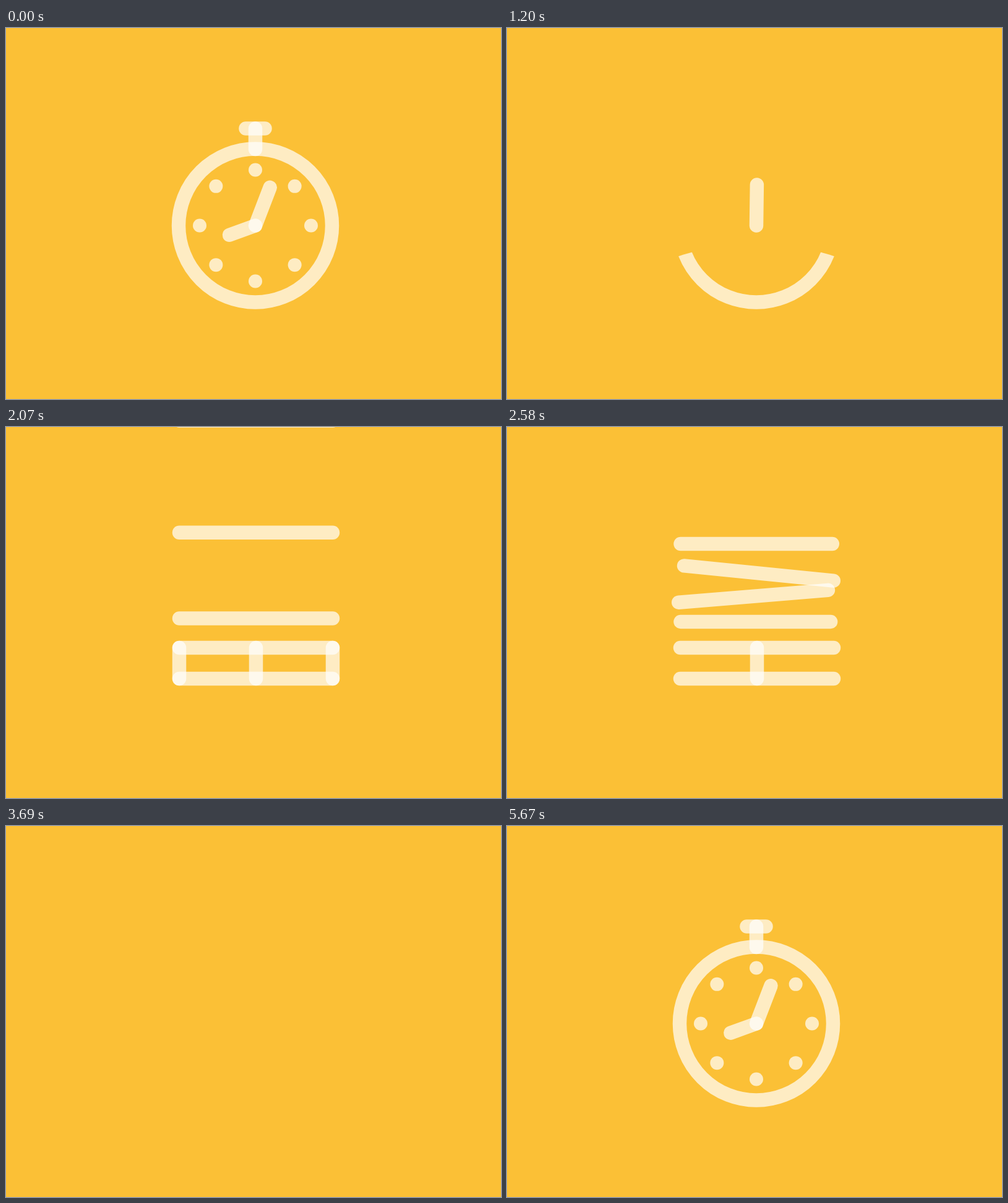
An HTML page with a canvas for the animation above (5.7 s loop, 800x600 px).

```html
<!DOCTYPE html>
<html lang="en">
<head>
<meta charset="utf-8">
<title>Stopwatch to cart</title>
<style>
html, body { margin: 0; width: 100%; height: 100%; overflow: hidden; background: #fbc036; }
canvas { display: block; width: 800px; height: 600px; }
</style>
</head>
<body>
<canvas id="stage" width="800" height="600"></canvas>
<script>
const ctx = document.getElementById('stage').getContext('2d');
const LOOP = 5700, STEP = 30, W = 22.5, RAD = Math.PI / 180;
const CX = 403, CY = 319.5, RING = 124;

const clamp = x => Math.max(0, Math.min(1, x));
const span = (t, a, b) => clamp((t - a) / (b - a));
const mix = (a, b, p) => a + (b - a) * p;
const easeOut = p => 1 - (1 - p) ** 3;
const easeInOut = p => (1 - Math.cos(Math.PI * p)) / 2;
const backOut = p => 1 + 2.7 * (p - 1) ** 3 + 1.7 * (p - 1) ** 2;

// Damped overshoot from 0 to 1, starting at time a.
function spring(t, a, k = 8, w = 17.6) {
  const s = (t - a) / 1000;
  return s <= 0 ? 0 : 1 - Math.exp(-k * s) * Math.cos(w * s);
}

function line(x1, y1, x2, y2) {
  ctx.beginPath();
  ctx.moveTo(x1, y1);
  ctx.lineTo(x2, y2);
  ctx.stroke();
}

function dot(x, y, r = 11) {
  if (r <= 0) return;
  ctx.beginPath();
  ctx.arc(x, y, r, 0, 7);
  ctx.fill();
}

// Bar: centre, half length, angle in degrees.
const bar = (x, y, half, deg) => ({ x, y, half, deg });

function drawBar(b) {
  const dx = b.half * Math.cos(b.deg * RAD), dy = b.half * Math.sin(b.deg * RAD);
  line(b.x - dx, b.y - dy, b.x + dx, b.y + dy);
}

function morph(a, b, p) {
  drawBar(bar(mix(a.x, b.x, p), mix(a.y, b.y, p), Math.max(0, mix(a.half, b.half, p)), mix(a.deg, b.deg, p)));
}

function hand(deg, len) {
  if (len < 0.5) return;
  line(CX, CY, CX + len * Math.sin(deg * RAD), CY - len * Math.cos(deg * RAD));
}

function ring(half = 180) {
  ctx.lineCap = 'butt';
  ctx.beginPath();
  ctx.arc(CX, CY, RING, (90 - half) * RAD, (90 + half) * RAD);
  ctx.stroke();
  ctx.lineCap = 'round';
}

function knob(dy = 0, grow = 1) {
  const top = mix(196, 162.5, grow) + dy;
  line(CX, top, CX, 196 + dy);
  line(CX - 15.5 * grow, top, CX + 15.5 * grow, top);
}

function dots(radius) {
  for (let a = 0; a < 360; a += 45) {
    dot(CX + 90 * Math.sin(a * RAD), CY - 90 * Math.cos(a * RAD), radius(a || 360));
  }
}

// The long hand sweeps round, wipes the dots and knocks the knob away.
function unwind(t) {
  const u = Math.max(0, t - 720) / 1000;
  const sweep = mix(21, 360, easeInOut(span(t, 0, 720)));
  const angle = sweep + 12 * Math.sin(18 * u) * Math.exp(-5 * u);

  ctx.save();
  if (t > 720) {
    const edge = 175 + 174 * ((t - 720) / 480) ** 1.6;
    ctx.beginPath();
    ctx.arc(CX, edge + 406, 406, 0, 7);
    ctx.clip();
  }
  if (t < 1410) ring();
  ctx.restore();

  const lift = span(t, 690, 960);
  if (lift < 1) knob(-230 * lift);
  dots(a => 11 * (1 - span(sweep, a - 18, a)));
  hand(Math.max(250, sweep), 44.7 * (1 - span(sweep, 250, 340)));

  if (t <= 1200) return hand(angle, 66);
  // Toss: up for 98 ms, then down to the floor.
  const s = t - 1298;
  const y = s < 0 ? 117 + 170 * (s / 98) ** 2 : 117 + 265 * (s / 122) ** 2;
  drawBar(bar(mix(403, 404, span(t, 1200, 1420)), y, mix(33, 25, span(t, 1200, 1420)), 90));
}

const DECK = bar(404, 357, 124, 0), FLOOR = bar(404, 407, 124, 0), POST = bar(404, 382, 25, 90);
const PLANKS = [
  [bar(404, 313.5, 124, 0), bar(362, 340.5, 72, 0)],
  [bar(404, 274, 124, 0), bar(290.5, 269.5, 71, -90)],
  [bar(404, 234.7, 124, 0), bar(459.7, 269.5, 75.3, 109.6)],
  [bar(404, 188.5, 124, 0), bar(388, 198, 97.5, 0)]
];

function pallet(t) {
  const grow = easeOut(span(t, 1410, 1620));
  for (const b of [DECK, FLOOR]) drawBar({ ...b, half: b.half * grow });
  drawBar(POST);
  const out = t < 2050 ? spring(t, 1422, 6, 18) : 1;
  const half = 25 * (1 - span(t, 2220, 2370));
  if (half > 0) {
    for (const side of [-1, 1]) drawBar({ ...POST, x: 404 + side * 124 * out, half });
  }
  PLANKS.forEach(([b], i) => {
    const start = 1815 + 110 * i, fall = span(t, start, start + 180);
    if (!fall) return;
    const hop = 8 * Math.sin(Math.PI * span(t, start + 180, start + 270));
    drawBar({ ...b, y: mix(-20, b.y, fall * fall) - hop });
  });
}

function cart(t) {
  const settle = (a) => t >= 3180 ? 1 : spring(t, a);
  const go = span(t, 3300, 3690);
  if (go === 1) return;
  ctx.save();
  if (go > 0) {
    const tilt = 20 * easeInOut(clamp(go * 2.5)), run = 690 * go ** 2.2;
    ctx.translate(434 - run * Math.cos(tilt * RAD), 408 - run * Math.sin(tilt * RAD));
    ctx.rotate(tilt * RAD);
    ctx.translate(-434, -408);
  }
  for (const [a, b] of PLANKS) morph(a, b, settle(2574));
  morph(DECK, bar(376, 379, 86, 0), settle(2582));
  morph(FLOOR, bar(495.5, 288.5, 96.6, 110.3), settle(2586));
  morph(POST, bar(546, 198, 17, 0), settle(2610));
  const roll = 540 * (1 - easeOut(span(t, 2670, 3120)));
  dot(310 + roll, 407.5);
  dot(434 + roll, 407.5);
  ctx.restore();
}

function rewind(t) {
  ring(180 * easeInOut(span(t, 3960, 4230)));
  const rise = easeOut(span(t, 4140, 4290));
  if (rise > 0) knob(0, rise);
  const r = 11 * spring(t, 4710);
  if (r > 0) dots(() => r);
  if (t > 5310) {
    const len = spring(t, 5310, 12, 20), turn = backOut(span(t, 5310, 5670));
    hand(mix(-339, 21, turn), 66 * len);
    hand(mix(-110, 250, turn), 44.7 * len);
  }
}

function draw(t) {
  ctx.globalAlpha = 1;
  ctx.fillStyle = '#fbc036';
  ctx.fillRect(0, 0, 800, 600);
  ctx.globalAlpha = 0.7;
  ctx.fillStyle = ctx.strokeStyle = '#fff';
  ctx.lineWidth = W;
  ctx.lineCap = 'round';
  if (t < 1420) unwind(t);
  else if (t < 2574) pallet(t);
  else if (t < 3900) cart(t);
  else if (t > 3960) rewind(t);
}

const begin = performance.now();
function tick() {
  const t = (performance.now() - begin) % LOOP;
  draw(Math.floor(t / STEP) * STEP);
  requestAnimationFrame(tick);
}
tick();
</script>
</body>
</html>
```
